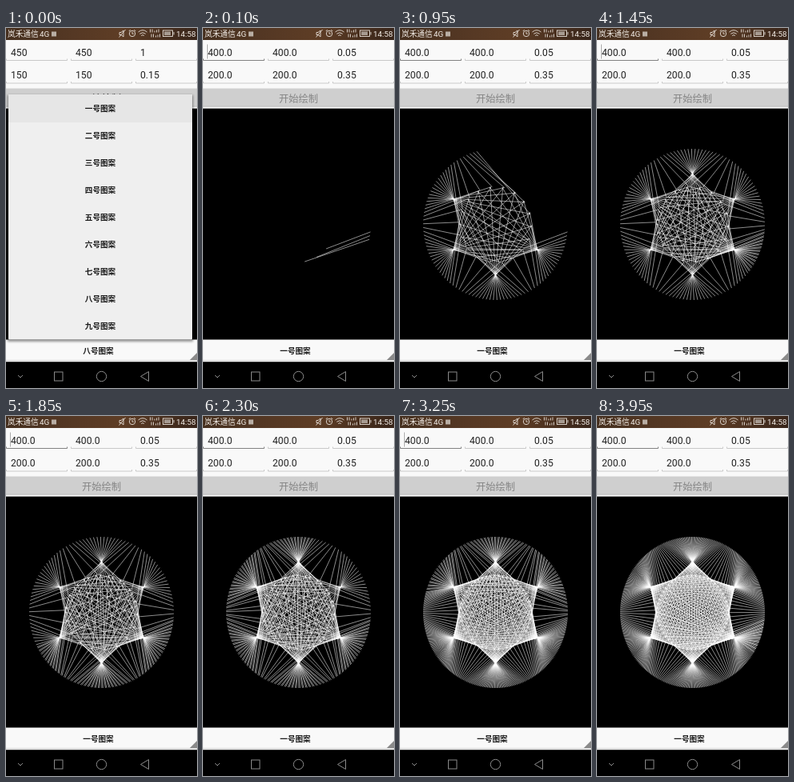
Animation, 239 px wide and 450 px high, one loop 4000 ms. Source, as an HTML page with a canvas:

```html
<!DOCTYPE html>
<html lang="zh">
<head>
<meta charset="utf-8">
<title>图案绘制</title>
<style>
html, body { margin: 0; width: 100%; height: 100%; overflow: hidden; background: #000; }
canvas, svg { position: absolute; left: 0; top: 0; width: 239px; height: 450px; display: block; }
text { font-family: "Noto Sans CJK SC", "Noto Sans CJK", sans-serif; }
.num { font: 12.2px Roboto, sans-serif; fill: #222; }
.item { font-size: 9.6px; font-weight: 700; fill: #1a1a1a; text-anchor: middle; }
.btn { font-size: 12.3px; text-anchor: middle; }
.bar { font-size: 9.7px; fill: #f2ece6; }
.time { font: 9.9px Roboto, sans-serif; fill: #f2ece6; }
</style>
</head>
<body>
<canvas id="art"></canvas>
<svg viewBox="0 0 239 450" xmlns="http://www.w3.org/2000/svg">
  <defs>
    <linearGradient id="wood">
      <stop offset="0" stop-color="#46301f"/><stop offset=".35" stop-color="#553824"/>
      <stop offset=".6" stop-color="#5e3d25"/><stop offset="1" stop-color="#38251a"/>
    </linearGradient>
    <filter id="soft" x="-5%" y="-5%" width="110%" height="110%"><feGaussianBlur stdDeviation="1.6"/></filter>
  </defs>

  <rect width="239" height="15" fill="url(#wood)"/>
  <text class="bar" x="2" y="10.6">岚禾通信</text>
  <text class="time" x="42" y="10.6">4G</text>
  <rect x="57" y="4.5" width="6" height="6" fill="#b9aea4"/>
  <g fill="none" stroke="#e6dfd8" stroke-width=".9">
    <path d="M142 5.500h2l3-2.500v8l-3-2.500h-2zM141.500 11.500l8-9.500"/>
    <circle cx="158" cy="7" r="3.700"/><path d="M158 4.800v2.400h1.800M153.800 4l1.900-1.900M162.200 4l-1.900-1.900"/>
    <path d="M165.500 5q5.500-4.600 11 0M167.300 7.300q3.700-3 7.400 0M169.200 9.500q1.800-1.500 3.600 0"/>
    <path d="M180.500 1.500v4M183 1.500v4M186 5.500v-2M188.500 5.500v-3M191 5.500v-4M182 11.500v-4M184.500 11.500v-4M187.500 11.500v-2M190 11.500v-3M192.500 11.500v-4"/>
    <rect x="196.500" y="3" width="12" height="7.500"/><path d="M210 5v3.500"/>
  </g>
  <rect x="198" y="4.500" width="8" height="4.500" fill="#a89c92"/>
  <text class="time" x="237.500" y="10.600" text-anchor="end">14:58</text>

  <rect y="15" width="239" height="85.600" fill="#f9f9f9"/>
  <g id="fields"></g>
  <path id="caret" d="M5.500 20.500v18" stroke="#999" stroke-width=".8"/>
  <rect y="75.500" width="239" height="23" fill="#cfcfcf"/>
  <rect y="97.500" width="239" height="1" fill="#bdbdbd"/>
  <text id="btn" class="btn" x="119.500" y="92.900">开始绘制</text>

  <rect y="389.500" width="239" height="28" fill="#f9f9f9"/>
  <path d="M0 415.500H239" stroke="#ccc" stroke-width=".8"/>
  <path d="M239 406v9h-9z" fill="#8a8a8a"/>
  <text id="pick" class="item" x="115.500" y="407.400"></text>

  <rect y="417.500" width="239" height="32.500" fill="#000"/>
  <g fill="none" stroke="#8a8a8a" stroke-width="1">
    <path d="M15 434l3 3 3-3M178.500 429.500v12l-10-6z"/>
    <rect x="60.500" y="430" width="10.500" height="11"/>
    <circle cx="119.500" cy="435.500" r="6.200"/>
  </g>

  <g id="menu">
    <rect x="2" y="84" width="232" height="308" fill="#000" opacity=".4" filter="url(#soft)"/>
    <rect x="3" y="83" width="230" height="306.500" rx="1" fill="#efefef"/>
    <rect x="3" y="83" width="230" height="35" fill="#e6e6e6"/>
  </g>
</svg>
<script>
const LOOP = 4000, TICK = 50;
const CX = 119.5, CY = 245.5, RX = 90.5, RY = 94.5;
const STEP_OUT = 0.05, STEP_IN = 0.35;
const NS = 'http://www.w3.org/2000/svg';
const get = id => document.getElementById(id);

function add(parent, tag, attrs, text) {
  const el = document.createElementNS(NS, tag);
  for (const k in attrs) el.setAttribute(k, attrs[k]);
  if (text) el.textContent = text;
  parent.appendChild(el);
  return el;
}

const before = ['450', '450', '1', '150', '150', '0.15'];
const after = ['400.0', '400.0', '0.05', '200.0', '200.0', '0.35'];
const inputs = before.map((value, i) => {
  const x = i % 3 * 81, y = i < 3 ? 0 : 28.5;
  const line = add(get('fields'), 'path', {
    d: `M${x + .5} ${y + 38.5}v2h76v-2`, fill: 'none', stroke: '#c4c4c4', 'stroke-width': .9
  });
  const text = add(get('fields'), 'text', { class: 'num', x: x + 6, y: y + 34.7 });
  return { line, text };
});

[...'一二三四五六七八九'].forEach((c, i) =>
  add(get('menu'), 'text', { class: 'item', x: 118, y: 103.6 + 34.1 * i }, c + '号图案'));

const art = get('art'), ctx = art.getContext('2d');
const dpr = window.devicePixelRatio || 1;
art.width = 239 * dpr;
art.height = 450 * dpr;
ctx.scale(dpr, dpr);

// Spokes join an outer circle to a half-size one turning seven times faster.
function drawSpokes(last) {
  ctx.clearRect(0, 0, 239, 450);
  ctx.strokeStyle = '#fff';
  ctx.lineWidth = 0.55;
  for (let n = 2; n <= last; n++) {
    const a = n * STEP_OUT, b = n * STEP_IN;
    ctx.beginPath();
    ctx.moveTo(CX + RX * Math.cos(a), CY + RY * Math.sin(a));
    ctx.lineTo(CX + RX / 2 * Math.cos(b), CY + RY / 2 * Math.sin(b));
    ctx.stroke();
  }
}

function setForm(open) {
  get('menu').style.display = open ? '' : 'none';
  get('pick').textContent = open ? '八号图案' : '一号图案';
  get('btn').setAttribute('fill', open ? '#111' : '#858585');
  inputs.forEach((f, i) => f.text.textContent = (open ? before : after)[i]);
  inputs[0].line.setAttribute('stroke', open ? '#c4c4c4' : '#777');
}

let shown = -1;
function render(now) {
  const tick = Math.floor(now % LOOP / TICK);
  if (tick === shown) return;
  shown = tick;
  const open = tick === 0;
  const blink = Math.floor((tick * TICK - 338) / 292);
  setForm(open);
  get('caret').style.display = !open && blink % 2 ? '' : 'none';
  drawSpokes(Math.min(5 * tick - 6, 388));
}

const start = performance.now();
function loop() {
  render(performance.now() - start);
  requestAnimationFrame(loop);
}
loop();
</script>
</body>
</html>
```
